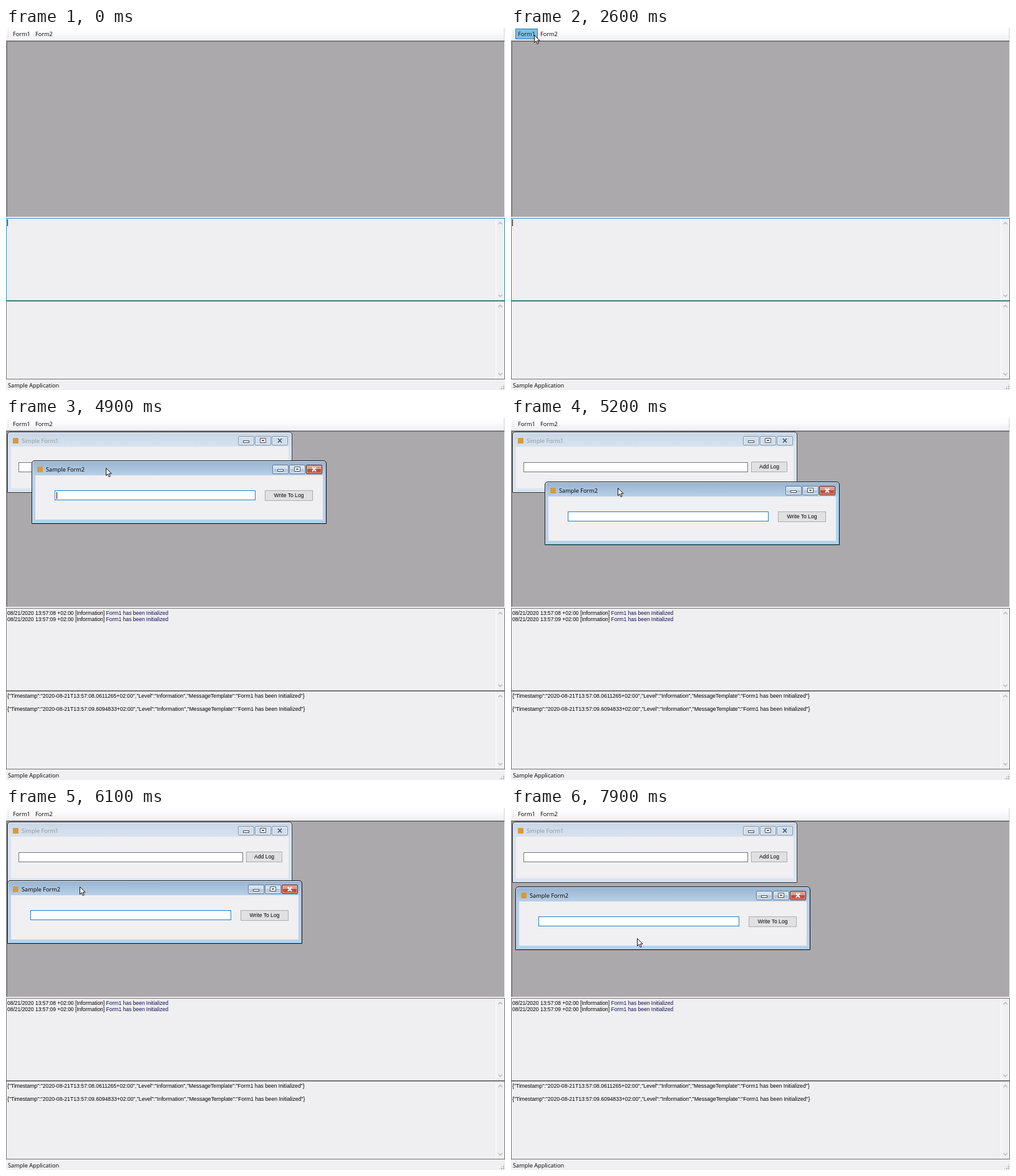
Recreate the animation shown at these times as an HTML page. Size 800 by 581 pixels, loop 8 s.

```html
<!DOCTYPE html>
<html lang="en">
<head>
<meta charset="utf-8">
<title>Sample Application</title>
<style>
html, body { margin: 0; width: 100%; height: 100%; overflow: hidden; }
body { position: relative; background: #f0eff1; color: #000; font: 9.2px/12px "Open Sans", "Noto Sans", sans-serif; }
div, span, svg { position: absolute; box-sizing: border-box; white-space: pre; }
[hidden] { display: none !important; }

#bar { left: 0; top: 0; width: 799px; height: 20px; background: linear-gradient(#fdfcff 30%, #efeef1); border-right: 1px solid #dddce0; border-radius: 0 0 3px 0; }
#grip { left: 3px; top: 4px; width: 1px; height: 11px; background: repeating-linear-gradient(#a9a8ac 0 1px, transparent 1px 3px); }
.tool { top: 1px; width: 36px; height: 17px; padding: 1.5px 0 0 3px; border: 1px solid transparent; }
.tool.hot { background: #7fbee2; border-color: #2f7fb2; color: #10104a; }

#mdi { left: 0; top: 20px; width: 800px; height: 284px; background: #aba9ab; border: 1px solid; border-color: #8f8e91 #fff #f4f3f5 #a3a2a5; box-shadow: inset 1px 1px #68676a; }

.log { left: 0; width: 800px; border: 1px solid #747376; background: #efeef0; font: 8.5px/10.3px "Liberation Sans", Arial, sans-serif; }
.log span { left: 1px; }
.log i { position: static; font-style: normal; color: #0c0c50; }
.log.focus { border-color: #3f86b8 #3f86b8 #2b7476 #2f8fd0; }
.scroll { right: 0; top: 0; bottom: 0; width: 14px; border-left: 1px solid #fff; background: #f0eff1; }
.scroll svg { left: 3px; width: 7px; height: 5px; fill: none; stroke: #b9b8bb; stroke-width: 1.5; }
.scroll svg + svg { bottom: 5px; transform: scaleY(-1); }

#status { left: 3px; top: 568px; }
#size { right: 1px; bottom: 0; width: 9px; height: 9px; background: repeating-conic-gradient(#9c9b9f 0 25%, transparent 0 100%) 0 0 / 3px 3px; clip-path: polygon(100% 0, 100% 100%, 0 100%); }

.win { border: 1px solid #10161c; border-radius: 5px 5px 0 0; background: linear-gradient(#98b3d0, #b9d1e8 24px, #b9d1ea); box-shadow: inset 1px 1px #d5e5f5, inset -1px -1px #84c6e2; }
.win.off { border-color: #34383d; background: linear-gradient(#c9d6e6, #d8e3ef 24px, #d7e4f2); box-shadow: inset 0 0 0 1px #e9f0f8; }
.client { left: 5px; right: 5px; top: 23px; bottom: 6px; background: #f0eff1; }
.icon { left: 8px; top: 9px; width: 9px; height: 9px; background: #d69b3c; }
.title { left: 22px; top: 8px; }
.off .title { color: #929498; }
.cap { top: 6px; width: 26px; height: 15px; border: 1px solid #62768d; border-radius: 2px; background: linear-gradient(#d3e1f0 45%, #aec4dc 50%, #c3d6ea); box-shadow: inset 0 0 0 1px #e0ebf6; }
.off .cap { background: #d2deeb; border-color: #8794a4; }
.cap svg { left: 7px; top: 2px; width: 10px; height: 9px; fill: #fff; stroke: #48525e; }
.close { border-color: #64201d; background: linear-gradient(#dc9d91 45%, #bd4436 50%, #cb6555); box-shadow: inset 0 0 0 1px #e5aaa0; }
.off .close { box-shadow: inset 0 0 0 1px #e0ebf6; }
.close path { fill: none; stroke: #fff; stroke-width: 2; }
.off .close path { stroke: #4d5866; stroke-width: 1.6; }
.field { height: 16px; border: 1px solid #2480c4; background: #fff; }
.off .field { border-color: #77767a; }
.push { height: 17px; border: 1px solid #adacaf; background: #e1e0e2; text-align: center; font: 8.6px/15px "Liberation Sans", Arial, sans-serif; }
.caret { width: 1px; height: 11px; background: #000; }
#mouse { left: 0; top: 0; width: 12px; height: 17px; fill: #fff; stroke: #111; overflow: visible; }
</style>
</head>
<body>
<div id="bar">
  <div id="grip"></div>
  <div class="tool" style="left:7px">Form1</div>
  <div class="tool" style="left:43px">Form2</div>
</div>
<div id="mdi"></div>
<div class="log" id="plain" style="top:305px;height:133px"></div>
<div class="log" id="json" style="top:438px;height:126px;font-size:8.64px"></div>
<div id="status">Sample Application</div>
<div id="size"></div>
<svg id="mouse"><path d="M.5 .5V12.5L3.3 9.8L5.2 14.5L7.2 13.6L5.3 9.2H9.1Z"/></svg>

<script>
const LOOP = 8000, OPEN1 = 2800, OPEN2 = 4400, BLINK = 530;
const $ = id => document.getElementById(id);
const mouse = $('mouse'), plain = $('plain'), json = $('json');
const tools = [...document.querySelectorAll('.tool')];

function add(parent, cls, css = '', html = '') {
  const el = document.createElement('div');
  el.className = cls;
  el.style.cssText = css;
  el.innerHTML = html;
  parent.append(el);
  return el;
}

const glyphs = [
  '<rect x=".5" y="4.5" width="9" height="3"/>',
  '<path d="M.5 .5H9.5V7.5H.5ZM3.5 3.5H6.5V4.5H3.5Z"/>',
  '<path d="M2 1L8 7.5M8 1L2 7.5"/>'
];

// field: left, top, width; button: left, width
function makeWindow(title, w, h, field, button, label) {
  const win = add(document.body, 'win', `width:${w}px;height:${h}px`);
  add(win, 'client');
  add(win, 'icon');
  add(win, 'title', '', title);
  glyphs.forEach((g, i) => add(win, i === 2 ? 'cap close' : 'cap', `right:${60 - 27 * i}px`, `<svg>${g}</svg>`));
  const box = add(win, 'field', `left:${field[0]}px;top:${field[1]}px;width:${field[2]}px`);
  add(win, 'push', `left:${button[0]}px;top:47px;width:${button[1]}px`, label);
  return { win, caret: add(box, 'caret', 'left:2px;top:2px') };
}

const form1 = makeWindow('Simple Form1', 457, 98, [17, 48, 360], [382, 58], 'Add Log');
const form2 = makeWindow('Sample Form2', 473, 102, [36, 47, 322], [373, 77], 'Write To Log');
form1.win.style.left = '2px';
form1.win.style.top = '22px';
document.body.append(mouse);

for (const log of [plain, json]) {
  const arrow = '<svg style="Y"><path d="M.5 4L3.5 1L6.5 4"/></svg>';
  add(log, 'scroll', '', arrow.replace('Y', 'top:5px') + arrow.replace('Y', ''));
}
const logCaret = add(plain, 'caret', 'left:1px;top:1px');

function logLine(parent, top, html) {
  const el = document.createElement('span');
  el.style.top = top + 'px';
  el.innerHTML = html;
  parent.append(el);
  return el;
}
const entries = ['08.0611265', '09.6094833'].map((sec, i) => [
  logLine(plain, 2 + 10.3 * i, `08/21/2020 13:57:${sec.slice(0, 2)} +02:00 [Information] <i>Form1 has been Initialized</i>`),
  logLine(json, 2 + 20.6 * i, `{"Timestamp":"2020-08-21T13:57:${sec}+02:00","Level":"Information","MessageTemplate":"Form1 has been Initialized"}`)
]);

// Keys: time, x, y
const mousePath = [
  [100, 592, 574], [950, 384, 290], [1800, 70, 50], [2250, 38, 12], [2600, 37, 11], [3300, 37, 11],
  [3600, 74, 12], [4400, 74, 12], [4500, 98, 24], [4600, 140, 58], [4900, 160, 80], [5100, 182, 105],
  [5300, 159, 118], [5400, 144, 120], [5600, 118, 126], [6300, 118, 126], [6800, 127, 133],
  [7200, 124, 134], [7300, 124, 134], [7700, 202, 209]
];
const dragPath = [
  [4600, 23, 46], [4900, 41, 68], [5100, 65, 95], [5300, 42, 108], [5400, 27, 111],
  [5600, 2, 116], [6300, 2, 116], [6800, 10, 124], [7200, 7, 126]
];

function along(path, t) {
  const i = path.findIndex(k => k[0] > t);
  if (i === 0) return path[0].slice(1);
  if (i < 0) return path.at(-1).slice(1);
  const a = path[i - 1], b = path[i], p = (t - a[0]) / (b[0] - a[0]);
  return [1, 2].map(n => Math.round(a[n] + (b[n] - a[n]) * p));
}

function draw(now) {
  const t = Math.floor(now % LOOP / 100) * 100;
  const open1 = t >= OPEN1, open2 = t >= OPEN2;
  const [mx, my] = along(mousePath, t), [fx, fy] = along(dragPath, t);

  mouse.style.display = t < 100 ? 'none' : '';
  mouse.style.transform = `translate(${mx}px,${my}px)`;
  tools.forEach((el, i) => {
    const x = mx - 7 - 36 * i;
    el.classList.toggle('hot', my < 19 && x >= 0 && x < 36);
  });

  form1.win.hidden = !open1;
  form1.win.classList.toggle('off', open2);
  form2.win.hidden = !open2;
  form2.win.style.left = fx + 'px';
  form2.win.style.top = fy + 'px';
  plain.classList.toggle('focus', !open1);
  entries.forEach((pair, i) => pair.forEach(el => el.hidden = i ? !open2 : !open1));

  // The blink restarts whenever the focus changes or the drag ends
  const start = [7200, OPEN2, OPEN1, 0].find(s => t >= s);
  const lit = (t - start) % (2 * BLINK) < BLINK;
  logCaret.hidden = open1 || !lit;
  form1.caret.hidden = open2 || !lit;
  form2.caret.hidden = !lit;
}

const begin = performance.now();
(function tick() {
  draw(performance.now() - begin);
  requestAnimationFrame(tick);
})();
</script>
</body>
</html>
```
